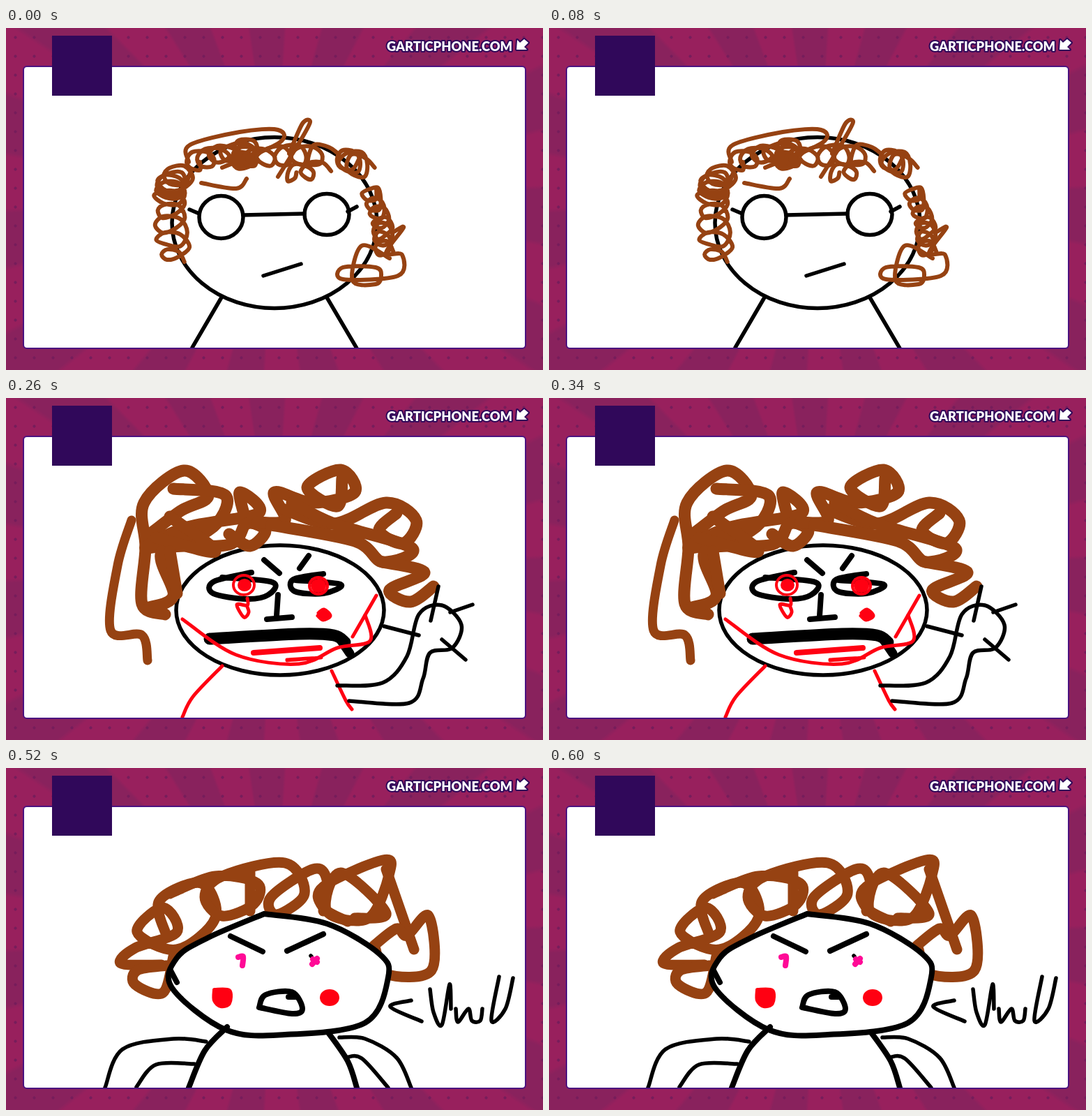
An HTML page that plays this animation: 770x490 px, repeating every 0.65 s.

```html
<!DOCTYPE html>
<html lang="en">
<head>
<meta charset="utf-8">
<title>Scribbled faces</title>
<style>
  html, body { margin: 0; width: 100%; height: 100%; overflow: hidden; }
  body {
    background:
      radial-gradient(circle, #761d5b 1.8px, transparent 2.4px) 0 0 / 27px 27px,
      repeating-conic-gradient(from 4deg at 385px 245px, #98205d 0 11deg, #89225d 12deg 23deg, #98205d 24deg);
  }
  svg { position: absolute; left: 0; top: 0; width: 770px; height: 490px; }
  .panel { fill: #fff; stroke: #4b1280; stroke-width: 2; }
  .pose {
    fill: none; stroke-linecap: round; stroke-linejoin: round;
    visibility: hidden;
    animation: show 650ms step-end calc((var(--i) - 5) * 130ms) infinite;
  }
  @keyframes show {
    0% { visibility: visible; }
    20%, 100% { visibility: hidden; }
  }
  .site {
    font: 900 18.3px Lato, sans-serif;
    fill: #fff; stroke: #30085a; stroke-width: 4; stroke-linejoin: round; paint-order: stroke;
  }
</style>
</head>
<body>
<svg viewBox="0 0 770 490">
  <clipPath id="inside"><rect x="26" y="56" width="718" height="402" rx="4"/></clipPath>
  <rect class="panel" x="25" y="55" width="720" height="404" rx="5"/>
  <g id="stage" clip-path="url(#inside)"></g>
  <rect x="66" y="11" width="86" height="86" fill="#30085a"/>
  <text class="site" x="546" y="33">GARTICPHONE.COM</text>
  <path class="site" d="M733 17L732 31L747 31L743 27L749 21L743 16L737 21Z"/>
</svg>
<script>
const NS = 'http://www.w3.org/2000/svg';
const INK = '#000', BROWN = '#964212', RED = '#ff0012', PINK = '#ff0a96';
const stage = document.getElementById('stage');
let group, color, width, poses = 0, seed = 7;

const random = () => (seed = seed * 16807 % 2147483647) / 2147483647;

function add(parent, tag, attrs) {
  const el = document.createElementNS(NS, tag);
  for (const k in attrs) el.setAttribute(k, attrs[k]);
  return parent.appendChild(el);
}

function pose() {
  group = add(stage, 'g', { class: 'pose', style: `--i:${poses++}` });
}

function pen(c, w) { color = c; width = w; }

const points = text => text.split(' ').map(s => s.split(',').map(Number));

// Smooth stroke through the points (Catmull-Rom to Bezier)
function smooth(p, fill = 'none') {
  let d = `M${p[0]}`;
  for (let i = 0; i < p.length - 1; i++) {
    const a = p[i - 1] || p[i], b = p[i], c = p[i + 1], e = p[i + 2] || c;
    const q = [0, 1].map(k => b[k] + (c[k] - a[k]) / 6);
    const r = [0, 1].map(k => c[k] - (e[k] - b[k]) / 6);
    d += `C${q} ${r} ${c}`;
  }
  add(group, 'path', { d, fill, stroke: color, 'stroke-width': width });
}

const line = (text, fill) => smooth(points(text), fill);

function oval(cx, cy, rx, ry, fill = 'none') {
  add(group, 'ellipse', { cx, cy, rx, ry, fill, stroke: color, 'stroke-width': width });
}

// Uneven loops that travel along a spine
function curl(text, rx, ry, turns) {
  const spine = points(text), last = spine.length - 1, out = [];
  for (let i = 0, n = turns * 6; i <= n; i++) {
    const s = i / n * last, k = Math.min(s | 0, last - 1), f = s - k;
    const t = i * Math.PI / 3, size = 0.65 + 0.4 * random();
    const at = j => spine[k][j] * (1 - f) + spine[k + 1][j] * f;
    out.push([at(0) + rx * size * Math.cos(t), at(1) + ry * size * Math.sin(t)]);
  }
  smooth(out);
}

// Glasses
pose();
pen(INK, 5.5);
oval(385, 279, 147, 122.5);
line('309,386 267,458');
line('460,386 503,459');
oval(308.5, 271, 31.5, 30.5);
oval(460, 267, 32, 29.5);
line('340,268 428,266');
line('263,260 277,266');
line('490,263 503,256');
line('369,355 423,338');
pen(BROWN, 6);
line('262,192 263,168 335,149 390,146 391,165 310,200');
line('390,213 420,165 436,135 425,137 406,180');
line('280,222 330,230 345,216');
curl('265,192 345,172 340,195', 20, 14, 9);
curl('345,186 460,180', 20, 16, 5);
curl('405,207 450,205', 16, 14, 2);
curl('485,185 510,200', 22, 20, 3);
curl('522,230 540,280 542,320', 14, 15, 7);
curl('245,208 235,240 240,335', 24, 18, 9);
line('556,292 570,286 545,322 568,325 562,355 483,360 483,343 530,343 538,355 530,367 497,362 510,312 550,330');

// Red grin
pose();
pen(INK, 5.5);
oval(384, 288, 152, 114.5);
line('303,392 300,403 267,455');
line('467,388 484,412 502,458');
pen(BROWN, 6);
line('127,174 140,172 200,212 240,248');
line('215,300 172,245 172,200 200,190');
line('188,293 218,185');
line('175,180 200,130 240,131 212,150 525,148');
line('218,148 415,128');
line('212,130 395,118 440,127 210,143');
line('160,212 290,160 515,133');
line('172,185 300,150 470,152');
line('298,107 240,170 300,160 182,200');
line('343,110 375,160 400,155');
line('470,120 480,160 445,180');
line('528,138 530,180 542,250');
line('528,138 545,160 530,190 545,235 550,170 572,165 552,178 540,150');
line('380,155 470,180 540,240');
curl('250,210 330,180 380,165', 18, 12, 7);
curl('280,218 300,212', 12, 20, 2);
curl('365,150 400,165', 22, 14, 3);
curl('445,200 500,210', 36, 18, 3);
curl('222,210 240,250', 20, 30, 4);
curl('238,300 240,340', 12, 20, 3);
line('485,247 560,225 590,212 588,245 567,268 587,212');
line('485,247 555,315 530,345 527,330 555,290 525,295');
pen(RED, 6);
for (let i = 0; i < 7; i++) {
  const x = 242 + i * 9, y = 292 + i * 14;
  smooth([[x, y], [x + 18, y + 35 - i * 4], [370, 348 + i * 8], [450, 344 + i * 7], [530 - i % 3 * 12, 312 + i * 7]]);
}
line('532,273 510,328 400,347 333,323');
line('243,290 285,365 330,386');
line('297,318 330,340');
line('480,360 545,313');
line('552,354 578,346');
pen(INK, 6);
line('264,308 310,338 400,367 475,379 548,354');
line('298,277 318,262 352,254 374,273 362,284 325,290 298,277');
line('310,275 350,263 322,280 360,275');
line('404,265 484,263 482,283 440,281 404,265 468,264');
line('388,293 387,327');
line('370,320 378,327 394,329');
pen(RED, 8);
line('337,266 336,282');
line('328,274 353,270');
pen(RED, 6);
line('455,261 446,267 456,272');

// Raised hand
pose();
pen(INK, 5.5);
oval(393, 304, 149, 93);
pen(BROWN, 13);
line('180,175 160,240 150,333 195,340 203,376');
pen(BROWN, 17);
line('228,310 195,295 200,215 198,150 255,104 290,140 250,162 200,200');
line('240,130 315,140 290,190 200,215 260,185 362,165 335,135 345,180');
line('205,300 240,283 225,218 320,210 345,180 372,190 350,212 320,195');
line('235,170 300,220 215,200');
line('235,220 245,280');
line('360,178 400,175 385,135 440,150 500,135 480,103 432,128 475,155 482,115');
line('400,160 470,180 545,150 588,175 570,208 535,190 560,165');
line('380,182 500,205 540,235 582,215 470,180 410,150');
line('540,235 600,250 550,275 580,292 613,270');
pen(INK, 8);
line('352,250 298,263 297,280 345,288 376,282 382,264 310,257');
line('455,252 412,260 414,277 455,280 480,267 415,261');
line('370,232 392,251');
line('434,226 421,244');
line('390,282 388,312');
line('374,317 410,314');
pen(INK, 17);
line('292,345 420,338 470,340 486,350');
pen(INK, 13);
line('478,344 493,366');
pen(RED, 4);
oval(341, 268, 15, 14);
oval(342, 268, 8, 7, RED);
oval(448, 269, 13, 12);
oval(448, 269, 9, 8, RED);
pen(RED, 5);
line('346,287 346,297 331,296 341,314 348,307 345,297');
line('448,308 456,303 465,312 455,318 447,312', RED);
line('253,317 330,368 420,381 475,358 522,348 515,311');
line('531,283 497,342');
line('403,376 452,372 403,375');
line('310,384 268,428 253,457');
line('467,391 487,433 496,446');
pen(RED, 8);
line('355,365 450,358');
pen(INK, 5.5);
line('542,327 592,340');
line('475,412 540,408 575,370 592,310 625,297 653,325 640,358 608,365 598,402 578,437 492,434');
line('620,270 609,319');
line('637,307 669,296');
line('625,346 659,375');

// Both fists up
pose();
pen(BROWN, 11);
curl('205,292 198,250 220,215', 34, 32, 6);
curl('225,205 280,175 350,155', 36, 30, 7);
curl('370,165 450,155 540,185', 38, 32, 8);
curl('578,220 578,265', 32, 28, 4);
pen(INK, 5.5);
oval(395, 307, 158, 79.5);
oval(405, 350, 90, 56);
oval(338, 277, 23, 18);
oval(440, 273, 21, 20);
line('298,297 270,307 303,315');
line('481,340 488,326 497,322');
line('492,311 505,310 520,319');
line('330,315 345,328 368,328 360,307');
line('387,299 389,323 419,325 420,299');
line('438,299 430,320 467,327 475,313');
line('338,393 345,370 385,371 373,398');
line('398,403 400,380 425,378 424,404');
line('450,388 450,375 470,372');
line('343,357 366,346');
line('410,350 430,366');
line('446,338 482,352');
line('304,356 304,357');
line('87,102 90,230 140,315 230,400 262,412');
line('122,125 165,250 270,378 288,388');
line('70,95 60,115 110,156 170,120 165,95');
line('72,100 95,148 150,145 158,95');
line('174,92 178,125 125,153');
line('655,160 662,220 630,345 545,388 500,380');
line('693,155 692,333 590,405 520,423 497,410');
line('622,68 605,105 665,137 712,138 714,78 608,70 592,104 640,118');
line('622,80 635,150 705,156 716,70 620,75');
line('690,78 640,95 650,98');
line('605,120 645,135 714,138 715,72');
line('312,377 302,380 260,458');
line('465,388 477,403 490,458');
pen(INK, 7.5);
line('325,241 340,254 377,259');
line('397,262 448,243');
pen(RED, 9);
line('328,275 343,272 347,281 328,275', RED);
pen(RED, 7);
line('430,265 432,275 450,269');

// Small pout
pose();
pen(BROWN, 15);
line('223,282 165,280 185,258 245,235 225,200 188,235 245,260 300,215 280,165 220,190 230,240');
line('240,270 225,322 185,310 188,290 230,283');
line('235,180 300,155 360,165 355,195 310,212 285,185 310,155 400,136 428,180 388,210 380,185 440,145 460,160 455,205');
line('350,145 350,205');
line('490,220 455,200 455,170 540,132 550,150 520,215 460,205 480,150 545,208 500,215');
line('545,145 585,260');
line('530,260 545,295 610,290 606,212 575,240 560,230 527,255');
pen(INK, 8);
line('370,209 460,223 535,266 548,300 515,365 400,382 315,375 238,315 245,272 290,243 370,209', '#fff');
line('236,290 245,307');
line('317,371 285,405 262,458');
line('462,379 490,420 503,458');
line('322,241 368,263');
line('403,262 455,238');
line('363,343 372,325 410,321 425,345 410,352 363,343');
line('405,328 415,328');
pen(INK, 5.5);
line('437,269 438,270');
line('287,392 240,388 167,403 142,458');
line('270,424 215,425 187,457');
line('478,386 515,388 560,415 581,458');
line('487,415 510,416 548,458');
line('581,333 551,342 596,363');
line('608,317 613,350 625,368 636,310 638,345');
line('645,345 648,364 663,345 668,362 680,362 683,345');
line('707,299 696,362 716,345 727,301');
pen(PINK, 8);
line('333,271 340,270 339,283');
line('439,281 446,273');
line('440,274 446,278');
pen(RED, 6);
line('299,318 320,319 320,337 308,341 299,333 299,318', RED);
oval(464, 329, 11, 9, RED);
</script>
</body>
</html>
```
